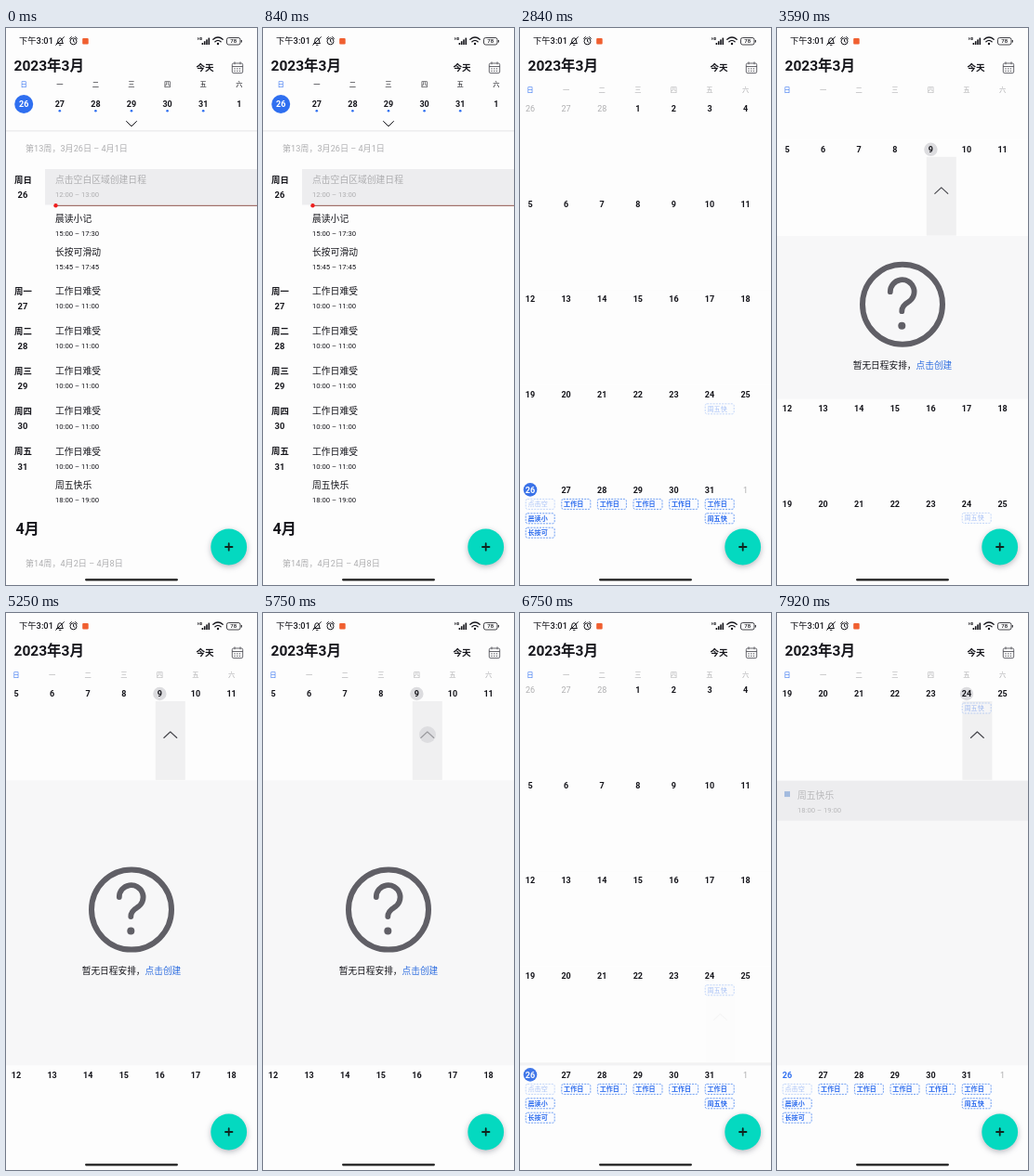
Animation of 270x600 px, one loop 8000 ms. Source, as an HTML page:

```html
<!DOCTYPE html>
<html lang="zh-CN">
<head>
<meta charset="utf-8">
<title>日历</title>
<style>
@property --p { syntax: "<number>"; inherits: true; initial-value: 0; }
@property --q { syntax: "<number>"; inherits: true; initial-value: 0; }
html, body { margin: 0; width: 100%; height: 100%; overflow: hidden; background: #fdfdfd; }
svg {
  display: block; width: 270px; height: 600px;
  font-family: Roboto, "Noto Sans CJK SC", "Noto Sans CJK", sans-serif;
  animation: openA 8s infinite ease-in-out, openB 8s infinite ease-in-out;
}
text { white-space: pre; }
/* --p opens the second week, --q the fourth */
@keyframes openA { 0%, 42.31% { --p: 0 } 47.06%, 71.88% { --p: 1 } 76.5%, 100% { --p: 0 } }
@keyframes openB { 0%, 84% { --q: 0 } 88.75%, 100% { --q: 1 } }

.week { transform: translateY(calc(var(--y) + var(--p) * var(--a) + var(--q) * var(--b))); }
.panelA { opacity: calc(var(--p) * 50); transform: translateY(calc(282.2px - 102.6px * var(--p))); }
.panelB { opacity: calc(var(--q) * 50); transform: translateY(calc(487.4px - 307.8px * var(--q))); }
.empty { transform: translateY(calc(154px * var(--p))); }
.pickA { opacity: calc(var(--p) * 3); }
.pickB { opacity: calc(var(--q) * 3); }
.today { opacity: calc(1 - 3 * var(--p) - 3 * var(--q)); }

.month { animation: month 8s infinite; }
@keyframes month { 0%, 23.5% { opacity: 0 } 26.9%, 100% { opacity: 1 } }
.menu {
  transform-origin: 270px 54px; filter: drop-shadow(0 1px 3px rgba(60, 60, 70, .4));
  animation: menu 8s infinite ease-out;
}
@keyframes menu {
  0%, 14.4% { opacity: 0; transform: scale(.6) }
  16.6%, 21.1% { opacity: 1; transform: none }
  23.1%, 100% { opacity: 0; transform: none }
}
.tap { fill: #d2d2d6; opacity: 0; animation: tap 8s infinite backwards; }
@keyframes tap { 0% { opacity: 0 } .8%, 2.2% { opacity: .75 } 3.4%, 100% { opacity: 0 } }
.fab { filter: drop-shadow(0 2px 3px rgba(60, 60, 80, .35)); }
</style>
</head>
<body>
<svg id="stage" viewBox="0 0 270 600"></svg>
<script>
const BG = '#fdfdfd', INK = '#15151b', GREY = '#aeaeb0', BLUE = '#2f6ff0', BAND = '#ededef', PANEL = '#f7f7f8';
const DAYS = [...'日一二三四五六'];
const ROW = 102.6, STEP = 38.6;

const text = (x, y, s, size, color = INK, weight = 400, anchor = 'start') =>
  `<text x="${x}" y="${y + size * .36}" font-size="${size}" fill="${color}" font-weight="${weight}" text-anchor="${anchor}">${s}</text>`;
const mid = (x, y, s, size, color, weight) => text(x, y, s, size, color, weight, 'middle');
const rect = (x, y, w, h, fill, more = '') => `<rect x="${x}" y="${y}" width="${w}" height="${h}" fill="${fill}" ${more}/>`;
const dot = (x, y, r, fill, more = '') => `<circle cx="${x}" cy="${y}" r="${r}" fill="${fill}" ${more}/>`;
const line = (d, color, width, more = '') =>
  `<path d="${d}" fill="none" stroke="${color}" stroke-width="${width}" stroke-linecap="round" stroke-linejoin="round" ${more}/>`;
const group = (cls, body, style = '') => `<g class="${cls}" style="${style}">${body}</g>`;
const event = (x, y, title, time, color = INK) =>
  text(x, y, title, 9.8, color, 500) + text(x, y + 16, time, 7.7, color);

function statusBar() {
  const bars = [0, 1, 2, 3].map(i => rect(210.6 + i * 2.3, 16 - i * 1.8, 1.6, 2 + i * 1.8, INK)).join('');
  return text(14, 14, '下午3:01', 9.3, INK, 500) +
    line('M55 16.5h6.5q-1.200-1-1.200-3.500a2.200 2.200 0 0 0-4.400 0q0 2.500-.9 3.500M57.500 18.300h1.500M53.700 18.300l8.800-8.600', INK, 1) +
    dot(72.5, 14.3, 3.5, 'none', `stroke="${INK}" stroke-width="1"`) +
    line('M72.500 12.500v2l1.300.8M68.500 11.300l1.900-1.700M76.500 11.300l-1.900-1.700', INK, 1) +
    rect(82.2, 11, 6.5, 6.5, '#f05f30', 'rx="1"') +
    text(206, 11.5, 'HD', 3.8, INK, 700) + bars +
    line('M222.800 12.300q5.200-4.600 10.400 0M224.900 14.700q3.100-2.700 6.200 0', INK, 1.3) + dot(228, 17, 1.2, INK) +
    rect(237.500, 10.500, 14.500, 7.500, 'none', `rx="2" stroke="${INK}" stroke-width=".8"`) +
    rect(252.800, 13, 1, 2.500, INK) + mid(244.7, 14.3, '78', 6, INK, 500);
}

function titleBar() {
  const ink = '#55555c';
  let dots = '';
  for (let i = 0; i < 6; i++) dots += rect(245.4 + i % 3 * 2.7, 43.3 + (i > 2) * 2.5, 1.3, 1.1, ink);
  return text(8.5, 40.5, '2023年3月', 15.5, INK, 600) + text(204.5, 43, '今天', 9.6, INK, 700) +
    rect(243.3, 38, 11.4, 10.6, 'none', `rx="1.5" stroke="${ink}" stroke-width=".9"`) +
    line('M243.500 41.500h11M246 36.800v2M252 36.800v2', ink, .9) + dots;
}

function listView() {
  const x = i => 19.2 + STEP * i;
  const strip = DAYS.map((d, i) => {
    const first = i === 0;
    return mid(x(i), 60, d, 7.3, first ? BLUE : INK) + (first ? dot(x(0), 82, 10, BLUE) : '') +
      mid(x(i), 82, i < 6 ? 26 + i : 1, 9, first ? '#fff' : INK, 600) +
      (i > 0 && i < 6 ? dot(x(i), 89.3, 1.3, BLUE) : '');
  }).join('');
  const label = (y, day, n) => text(9, y, '周' + day, 9.4, INK, 600) + mid(18, y + 16.3, n, 9.4, INK, 600);
  let work = '';
  for (let i = 1; i < 6; i++) {
    const y = 283.2 + 43.2 * (i - 1);
    work += label(y, DAYS[i], 26 + i) + event(53, y, '工作日难受', '10:00 – 11:00');
  }
  return strip + line('M129.500 100.500l5.500 5.500 5.500-5.500', INK, 1) +
    rect(0, 110.4, 270, 1, '#e4e4e6') +
    text(21, 130, '第13周，3月26日 – 4月1日', 9.1, GREY) +
    rect(42, 152, 228, 38.5, BAND) + label(163.3, '日', 26) +
    event(53, 163.3, '点击空白区域创建日程', '12:00 – 13:00', GREY) +
    rect(53, 190.8, 217, 1, '#8a4f48') + dot(53.5, 191.3, 2.2, '#ee2020') +
    event(53, 205, '晨读小记', '15:00 – 17:30') + event(53, 241, '长按可滑动', '15:45 – 17:45') +
    work + event(53, 492, '周五快乐', '18:00 – 19:00') +
    text(10.5, 539, '4月', 16, INK, 600) + text(21, 577, '第14周，4月2日 – 4月8日', 9.1, GREY);
}

function chip(col, slot, s, faded) {
  const x = 6.2 + STEP * col, y = 20 + 15.4 * slot;
  return `<g opacity="${faded ? .4 : 1}">` +
    rect(x, y, 31, 11, '#fafbfe', 'rx="2" stroke="#4a86f0" stroke-width=".8" stroke-dasharray="2 1.2"') +
    text(x + 2.3, y + 5.5, s, 7.1, '#2c6cee', faded ? 400 : 600) + '</g>';
}

function pick(col, cls) {
  const x = 6.4 + STEP * col;
  return group(cls, rect(x, 18, 32, 84.8, '#f0f0f1') + dot(11 + STEP * col, 10, 7.2, '#dcdcdf') +
    line(`M${x + 9} 57.500l7-6.500 7 6.500`, '#44444a', 1.1));
}

function week(r) {
  let body = rect(0, 0, 270, 103.2, BG);
  if (r === 1) body += pick(4, 'pickA');
  if (r === 3) body += pick(5, 'pickB') + chip(5, 0, '周五快', true);
  if (r === 4) {
    body += chip(0, 0, '点击空', true) + chip(0, 1, '晨读小') + chip(0, 2, '长按可') + chip(5, 1, '周五快');
    for (let c = 1; c < 6; c++) body += chip(c, 0, '工作日');
  }
  for (let c = 0; c < 7 && r < 5; c++) {
    const n = r * 7 + c - 2, x = 11 + STEP * c, other = n < 1 || n > 31;
    const shown = n < 1 ? n + 28 : n > 31 ? n - 31 : n;
    body += mid(x, 10, shown, 9, n === 26 ? BLUE : other ? GREY : INK, other ? 400 : 600);
    if (n === 26) body += group('today', dot(x, 10, 7.3, '#3a72e8') + mid(x, 10, n, 9, '#fff', 600));
  }
  const a = r < 2 ? -ROW : 2 * ROW, b = r < 4 ? -3 * ROW : 0;
  return group('week', body, `--y:${77 + ROW * r}px;--a:${a}px;--b:${b}px`);
}

function monthView() {
  const mark = '#605f66';
  const empty = group('empty',
    dot(135, -14, 43, 'none', `stroke="${mark}" stroke-width="6"`) +
    line('M121.800-27.500a12.900 12.900 0 1 1 19 11.300Q134.300-12.500 134.300-6.500', mark, 5.8) +
    dot(134.300, 9, 4, mark) +
    `<text x="135" y="55.500" font-size="9.7" font-weight="500" text-anchor="middle" fill="${INK}">暂无日程安排，<tspan fill="#2f6ee0">点击创建</tspan></text>`);
  const panels = group('panelA', rect(0, 0, 270, 308, PANEL) + empty) +
    group('panelB', rect(0, 0, 270, 308, PANEL) + rect(0, 1, 270, 43, BAND) +
      rect(8, 12.5, 6, 6, '#a3bbdf') + event(22, 16.5, '周五快乐', '18:00 – 19:00', '#b8b8ba'));
  const head = rect(0, 54, 270, 23, BG) +
    DAYS.map((d, i) => mid(11 + STEP * i, 66, d, 7.3, i ? GREY : BLUE)).join('');
  // the navigation strip hides the week below the fold
  return rect(0, 54, 270, 546, BG) + panels + [0, 1, 2, 3, 4, 5].map(week).join('') + head +
    rect(0, 595, 270, 5, BG);
}

const menu = rect(135, 54, 140, 133, '#fefefe') +
  ['三日', '单日', '单月', '列表'].map((s, i) => text(146.5, 70.5 + 33 * i, s, 10.5, INK, 500)).join('');

const taps = [[249, 43, 1000], [214, 136, 1440], [176, 200, 2990], [177, 131, 5560], [214, 400, 6480]]
  .map(([x, y, t]) => `<circle class="tap" cx="${x}" cy="${y}" r="9" style="animation-delay:${t}ms"/>`).join('');

document.getElementById('stage').innerHTML =
  rect(0, 0, 270, 600, BG) + listView() + group('month', monthView()) +
  rect(0, 0, 270, 54, BG) + statusBar() + titleBar() +
  group('fab', dot(239.7, 559, 19.4, '#04d9c0')) + line('M236 559h7.500M239.700 555.200v7.500', '#10251f', 1.8) +
  group('menu', menu) + taps + rect(85, 593.2, 100, 2.2, '#1a1a1a', 'rx="1.1"');
</script>
</body>
</html>
```
